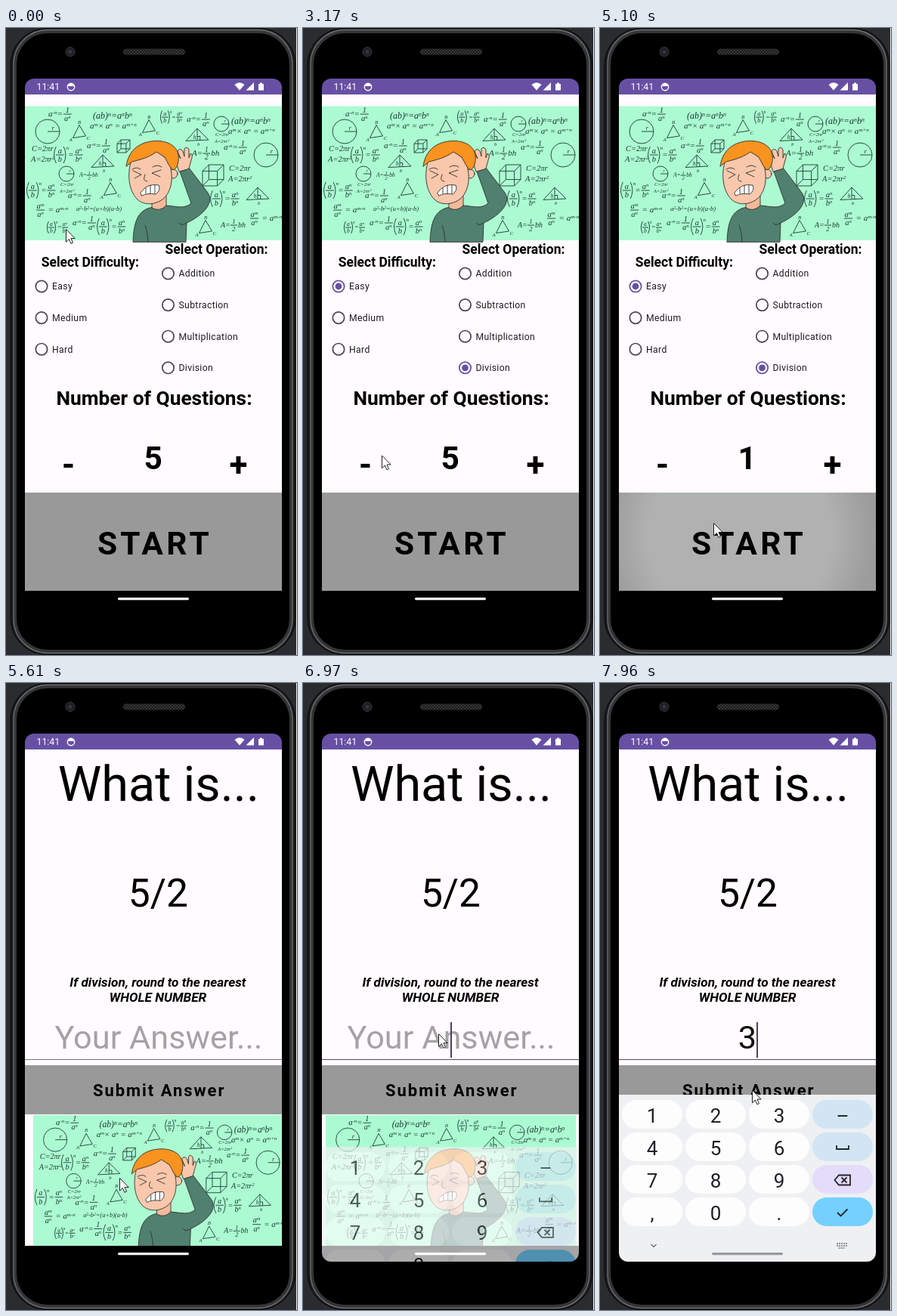
Write an HTML page that moves like this. It is 385 px wide and 830 px high and loops after 8 s.

```html
<!DOCTYPE html>
<html lang="en">
<head>
<meta charset="utf-8">
<title>Maths quiz app</title>
<style>
html, body { margin: 0; width: 100%; height: 100%; overflow: hidden; background: #2b2c2f; }
svg { display: block; width: 100vw; height: 100vh; }
svg svg { width: auto; height: auto; }
text { font-family: Roboto, sans-serif; white-space: pre; }
.mid { text-anchor: middle; }
.bold { font-weight: 700; }
.formula { font-family: "Liberation Serif", serif; font-style: italic; fill: #173c30; }
.sketch { fill: none; stroke: #173c30; stroke-width: .9; stroke-linejoin: round; }
.ink { stroke: #33302c; stroke-width: .9; stroke-linejoin: round; stroke-linecap: round; }
</style>
</head>
<body>
<svg id="stage" viewBox="0 0 385 830" xmlns="http://www.w3.org/2000/svg"></svg>
<script>
const LOOP = 8000;
const PURPLE = '#6750a4';
const PAPER = '#fffbfe';

const rect = (x, y, w, h, fill, rx = 0, extra = '') =>
  `<rect x="${x}" y="${y}" width="${w}" height="${h}" rx="${rx}" fill="${fill}" ${extra}/>`;
const circle = (x, y, r, extra = '') => `<circle cx="${x}" cy="${y}" r="${r}" ${extra}/>`;
const path = (d, extra = '') => `<path d="${d}" ${extra}/>`;
const text = (s, x, y, size, cls = '', extra = '') =>
  `<text x="${x}" y="${y}" font-size="${size}" class="${cls}" ${extra}>${s}</text>`;
const title = (s, x, y, size, extra) => text(s, x, y, size, 'bold mid', extra);
const spaced = n => `letter-spacing="${n}"`;

/* Handwritten formulas: "^n;" marks a superscript. */
const formula = (s, x, y, size, cls = '') => text(
  s.replace(/\^([^;]+);/g, '<tspan baseline-shift="40%" font-size="65%">$1</tspan>'),
  x, y, size, 'formula ' + cls);
const sketch = d => path(d, 'class="sketch"');
const fraction = (top, bottom, x, y, s) =>
  formula(top, x, y - s * .2, s * .95, 'mid') + formula(bottom, x, y + s * .85, s * .95, 'mid') +
  sketch(`M${x - s * .5} ${y}h${s}`);
const inverse = (x, y, s = 11) =>
  formula('a^-n;=', x, y + s * .3, s) + fraction('1', 'a^n;', x + s * 2.3, y, s);
const power = (x, y, s = 11) =>
  sketch(`M${x + s * .3} ${y - s}q${-s * .5} ${s} 0 ${s * 2}M${x + s * 1.2} ${y - s}q${s * .5} ${s} 0 ${s * 2}`) +
  fraction('a', 'b', x + s * .75, y, s) + formula('n', x + s * 1.5, y - s * .6, s * .65) +
  formula('=', x + s * 1.75, y + s * .3, s) + fraction('a^n;', 'b^n;', x + s * 3, y, s);
const quotient = (x, y, s = 11) =>
  fraction('a^m;', 'a^n;', x + s * .6, y, s) + formula('= a^m-n;', x + s * 1.5, y + s * .3, s);
const area = (x, y, s = 11) =>
  formula('A=', x, y + s * .3, s) + fraction('1', '2', x + s * 1.75, y, s * .9) + formula('bh', x + s * 2.3, y + s * .3, s);
const ring = (x, y, r = 16) => circle(x, y, r, 'class="sketch"') +
  sketch(`M${x} ${y}h${r}`) + formula('r', x + r * .35, y - 2, r * .55);
const roundRules = (x, y, s = 10.5) => formula('C=2πr', x, y, s) + formula('A=2πr^2;', x - 1, y + s * 1.35, s);
const triangle = (x, y, s = 8.5) => sketch(`M${x} ${y - s}L${x + s} ${y + s * .7}L${x - s} ${y + s}Z`) +
  formula('B', x - 2, y - s - 2, 7) + formula('A', x - s - 5, y + s + 4, 7) + formula('C', x + s + 1, y + s + 2, 7);
const heightTriangle = (x, y, s = 15) =>
  sketch(`M${x} ${y - s * .6}L${x + s} ${y + s * .4}L${x - s} ${y + s * .5}ZV${y + s * .45}M${x} ${y + s * .1}h${s * .25}v${s * .35}`) +
  formula('h', x - s * .35, y + s * .3, s * .5) + formula('b', x, y + s * .9, s * .45);
const cube = (x, y, s) => sketch(
  `M${x} ${y + s * .3}h${s * .7}v${s * .7}h${-s * .7}zl${s * .3} ${-s * .3}h${s * .7}l${-s * .3} ${s * .3}m${s * .3} ${-s * .3}v${s * .7}l${-s * .3} ${s * .3}M${x + s * .3} ${y}v${s * .7}h${s * .7}m${-s * .7} 0l${-s * .3} ${s * .3}`);

/* Groups that recur on the board. */
const powersNote = (x, y) => inverse(x, y) + formula('(ab)^n;=a^n;b^n;', x + 59, y + 6, 12) + formula('a^m;× a^n; = a^m+n;', x + 55, y + 19, 11);
const ringNote = (x, y) => ring(x, y, 10) + roundRules(x - 8, y + 16, 6.5);

const boy =
  path('M168 283C169 257 174 243 190 238L212 235C226 236 236 240 245 232L230 190L242 185L267 218C277 233 257 250 239 258L238 283Z', 'fill="#50806f" class="ink"') +
  path('M239 258Q232 263 229 258M188 283Q187 268 184 261', 'fill="none" class="ink"') +
  path('M193 225V238Q203 244 212 235V218Z', 'fill="#f3b99b" class="ink"') +
  path('M229 190L225 178Q222 168 229 169L231 173L227 163Q230 158 234 163L236 170V160Q239 156 242 161V172L244 166Q248 167 245 175L242 186Z', 'fill="#f8c7ac" class="ink"') +
  circle(221, 193, 6, 'fill="#f8c7ac" class="ink"') +
  path('M167 172C160 190 161 214 174 227C186 238 207 232 214 219C221 207 221 190 214 174L198 162Z', 'fill="#f8c7ac" class="ink"') +
  path('M159 183C161 167 171 153 192 150C212 147 231 156 228 176Q227 186 221 188C216 184 214 178 210 171Q204 167 199 164C188 172 178 174 167 177Z', 'fill="#f7931e" class="ink"') +
  path('M168 189L179 194L170 199M205 188L193 192L204 197M184 194Q180 203 187 203M167 187Q173 183 178 187M194 184Q200 180 206 184', 'fill="none" class="ink"') +
  path('M178 218Q187 205 202 208Q205 215 198 220Q187 218 180 222Z', 'fill="#fff" class="ink"') +
  path('M185 212V219M191 208V219M197 208V219', 'fill="none" class="ink" stroke-width=".6"');

const picture = rect(25, 103.5, 380, 177.5, '#acfad2') +
  powersNote(56, 114) + powersNote(239, 121) + ringNote(80, 193) + ringNote(285, 127) +
  [[107, 156], [82, 222], [88, 258], [288, 158]].map(p => inverse(...p)).join('') +
  ring(55, 137) + ring(344, 168) + roundRules(34, 163) + roundRules(295, 189) +
  power(63, 168) + power(27, 215) + power(270, 226) + power(120, 263) + power(204, 118, 8.5) + power(54, 264, 8) +
  [[97, 137], [189, 130], [138, 213], [264, 263]].map(p => triangle(...p)).join('') +
  [[253, 142], [128, 177], [333, 220]].map(p => heightTriangle(...p)).join('') +
  area(246, 166) + area(284, 261, 10) + area(97, 195, 7.5) +
  cube(147, 148, 17) + cube(260, 181, 28) + quotient(39, 241) + quotient(322, 252) +
  formula('a^2;-b^2;=(a+b)(a-b)', 93, 242, 8.6) + boy;

const option = (label, x, y) =>
  circle(x, y, 0, `id="${label}Ripple" fill="${PURPLE}" opacity=".1"`) +
  circle(x, y, 7.7, `id="${label}Ring" fill="none" stroke="#49454f" stroke-width="1.7"`) +
  circle(x, y, 0, `id="${label}Gap" fill="${PAPER}"`) + circle(x, y, 0, `id="${label}Dot" fill="${PURPLE}"`) +
  text(label, x + 14, y + 4.4, 12.2, '', 'fill="#1c1b1f" ' + spaced(.35));
const options = (labels, x, y) => labels.map((label, i) => option(label, x, y + 41.6 * i)).join('');

const setup = rect(25, 88, 380, 660, PAPER) + picture +
  title('Select Difficulty:', 111.3, 316, 17.5) + title('Select Operation:', 278.5, 299, 17.5) +
  options(['Easy', 'Medium', 'Hard'], 47, 342) +
  options(['Addition', 'Subtraction', 'Multiplication', 'Division'], 214.5, 325) +
  title('Number of Questions:', 196, 499, 26.3) +
  rect(32, 544, 101, 59, PURPLE, 29, 'id="minusRipple" opacity="0"') +
  title('-', 82.5, 592.5, 44) + title('+', 307.5, 592.5, 44) +
  title('5', 194.7, 584, 42.5, 'id="count"') +
  rect(25, 615, 380, 131, '#999') + rect(25, 615, 380, 131, 'url(#glow)', 0, 'id="startGlow"') +
  title('START', 197, 697, 42.5, spaced(4.2));

const question = rect(-15, 88, 420, 660, PAPER) +
  text('What is...', 196, 156, 64.8, 'mid') + text('5/2', 195.5, 295.5, 51.5, 'mid') +
  `<g font-style="italic">${title('If division, round to the nearest', 195, 402, 17.2)}${title('WHOLE NUMBER', 195, 422, 17.2)}</g>` +
  text('Your Answer...', 196, 484, 43.3, 'mid', 'id="hint" fill="#a5a2a5"') +
  text('3', 195, 484, 43.3, 'mid', 'id="answer" fill="#111"') +
  rect(-15, 498, 420, 1, '#79747e', 0, 'id="underline"') +
  rect(195, 449, 2, 47, '#49425f', 0, 'id="caret"') +
  rect(-15, 506, 420, 65, '#999') +
  title('Submit Answer', 196.8, 547, 22, spaced(1.96)) +
  `<g transform="translate(30 572) scale(.974) translate(-25 -103.5)">${picture}</g>` +
  rect(361.2, 571, 60, 180, PAPER);

const SIDE_COLOURS = ['#d2e5f3', '#d2e5f3', '#e3dcfb', '#73d0ff'];
const keys = ['123–', '456 ', '789 ', ',0. '].map((row, r) => [...row].map((label, c) =>
  rect(29 + 84 * c, 552 + 43 * r, 80, 38, c < 3 ? '#fdfdfe' : SIDE_COLOURS[r], 19) +
  text(label, 69 + 84 * c, 582 + 43 * r, 26, 'mid', 'fill="#1f2023"')).join('')).join('');
const keyboard = rect(25, 545, 340, 225, '#eff0f2') + keys +
  `<g fill="none" stroke="#25262a" stroke-width="1.8">` +
  path('M313 612v5h16v-5M316 651.5h15v13h-15l-5.5-6.5zM319.5 654.5l7 7m0-7l-7 7M314 701l4.5 4.5 9-9') +
  path('M67.5 743l3.5 3.5 3.5-3.5', 'stroke="#666" stroke-width="1.2"') +
  path('M313 742h14M313 745h14M315.5 748h9', 'stroke="#777" stroke-width="1.6" stroke-dasharray="2 1"') + '</g>';

const phone = rect(0, 0, 385, 830, '#2b2c2f') +
  rect(6, .5, 377, 829, '#1a1b1c', 48, 'stroke="#080808"') +
  rect(10, 2.5, 369, 825, '#343537', 45, 'stroke="#6c6d6f" stroke-width="1.3"') +
  rect(14, 7, 361, 816, '#000', 41) + rect(384, 0, 1, 830, '#eee') +
  circle(85, 31.5, 6, 'fill="#1d1e21" stroke="#3a3b3e"') + circle(85, 31.5, 2.6, 'fill="#35363c"') +
  rect(155, 27.5, 82, 8, 'url(#mesh)', 4);

const statusBar = rect(25, 67, 340, 21, PURPLE) + '<g fill="#fff">' +
  text('11:41', 40.5, 82, 12.3) +
  circle(86, 78, 4.7, 'fill="none" stroke="#fff" stroke-width="1.4"') + path('M81.5 77a4.7 4.7 0 0 1 9 0z') +
  path('M302.5 75Q309 69.5 315.5 75L309 82.5ZM317.5 82.5H328V72ZM334 74h2v-1.5h3V74h2v8.5h-7z') + '</g>';

document.getElementById('stage').innerHTML = `
<defs>
  <clipPath id="screen">${rect(25, 67, 340, 699, '#000', 12)}</clipPath>
  <pattern id="mesh" width="4" height="4" patternUnits="userSpaceOnUse">${rect(0, 0, 4, 4, '#1b1b1c')}${path('M0 4L4 0M0 0L4 4', 'stroke="#3c3d3f" stroke-width=".8"')}</pattern>
  <radialGradient id="glow" gradientUnits="userSpaceOnUse" cx="185" cy="672" r="175">
    <stop offset=".68" stop-color="#b1b1b1"/><stop offset="1" stop-color="#9c9c9c"/>
  </radialGradient>
</defs>
${phone}
<g clip-path="url(#screen)">
  <g id="setup">${setup}</g><g id="question">${question}</g>
  ${rect(25, 745, 340, 25, '#000')}${statusBar}
  <g id="keyboard">${keyboard}</g>
</g>
${rect(148, 754, 94, 3.2, '#fff', 1.6, 'id="handle"')}
${path('M0 .5V17.2L3.9 13.5L6.4 19.3L9 18.2L6.5 12.5H11.7Z', 'id="pointer" fill="#fff" stroke="#222" stroke-width="1" stroke-linejoin="round"')}`;

/* Where the pointer comes to rest: arrival time and place. */
const STOPS = [
  [0, 79.5, 266], [270, 72, 283], [750, 61, 340], [1370, 46.5, 348], [2000, 239, 478], [2300, 219, 453],
  [3170, 104.5, 565.5], [3530, 84, 577], [4840, 150.5, 655], [6610, 179.5, 464], [7960, 201.5, 538.5]];
const MINUS_PRESSES = [3410, 3800, 4200, 4460];
const CLICK = 120;
const START_PRESS = 5100, SWITCH = 5610, FOCUS = 6610, KEYBOARD_OPEN = 6830, BLINK = 7330, TYPED = 7600;

const clamp = v => Math.min(1, Math.max(0, v));
const easeOut = (p, power = 2) => 1 - (1 - clamp(p)) ** power;
const el = id => document.getElementById(id);
const set = (id, attrs) => { for (const k in attrs) el(id).setAttribute(k, attrs[k]); };
const show = (id, on) => set(id, { display: on ? 'inline' : 'none' });

/* Longer moves take longer, and each one ends at its arrival time. */
function pointerAt(t) {
  let [, x, y] = STOPS[0];
  for (const [arrival, toX, toY] of STOPS.slice(1)) {
    const duration = 200 + 1.4 * Math.hypot(toX - x, toY - y);
    const p = easeOut(1 - (arrival - t) / duration);
    if (p < 1) return [x + (toX - x) * p, y + (toY - y) * p];
    [x, y] = [toX, toY];
  }
  return [x, y];
}

const pulse = age => age < 0 ? 0 : clamp(.5 + age / 240) * clamp((600 - age) / 200);

function drawOption(id, age) {
  const chosen = age >= CLICK;
  const settle = easeOut((age - CLICK + 20) / 320);
  set(id + 'Ripple', { r: age < 0 ? 0 : 11 + 4.5 * clamp(age / CLICK), opacity: .1 * clamp((480 - age) / 120) });
  set(id + 'Ring', { stroke: chosen ? PURPLE : '#49454f', fill: chosen ? PURPLE : 'none' });
  set(id + 'Gap', { r: chosen ? 6.8 * settle : 0 });
  set(id + 'Dot', { r: chosen ? 4.4 * settle ** 2 : 0 });
}

function draw(t) {
  set('pointer', { transform: `translate(${pointerAt(t)})` });
  drawOption('Easy', t - 1370);
  drawOption('Division', t - 2540);
  el('count').textContent = 5 - MINUS_PRESSES.filter(press => t >= press + CLICK).length;
  set('minusRipple', { opacity: .12 * Math.max(...MINUS_PRESSES.map(press => pulse(t - press))) });
  show('startGlow', t >= START_PRESS);
  set('glow', { r: 175 + 2 * Math.max(0, t - START_PRESS) });

  const asking = t >= SWITCH;
  show('setup', !asking);
  show('question', asking);
  set('setup', { transform: `translate(${-34 * clamp((t - 5350) / 260)} 0)` });
  set('question', { transform: `translate(${6 * Math.exp((SWITCH - t) / 65)} 0)` });

  const typed = t >= TYPED;
  show('hint', !typed);
  show('answer', typed);
  show('caret', t >= FOCUS && (t < BLINK || typed));
  set('caret', { x: typed ? 207 : 195 });
  set('underline', { fill: t >= FOCUS ? '#56496f' : '#79747e' });

  const open = easeOut((t - KEYBOARD_OPEN) / 380, 2.5);
  set('keyboard', { transform: `translate(0 ${221 * (1 - open)})`, opacity: open });
  set('handle', { fill: t >= BLINK ? '#98999b' : '#fff' });
}

const start = performance.now();
function tick() {
  draw((performance.now() - start) % LOOP);
  requestAnimationFrame(tick);
}
draw(0);
tick();
</script>
</body>
</html>
```
